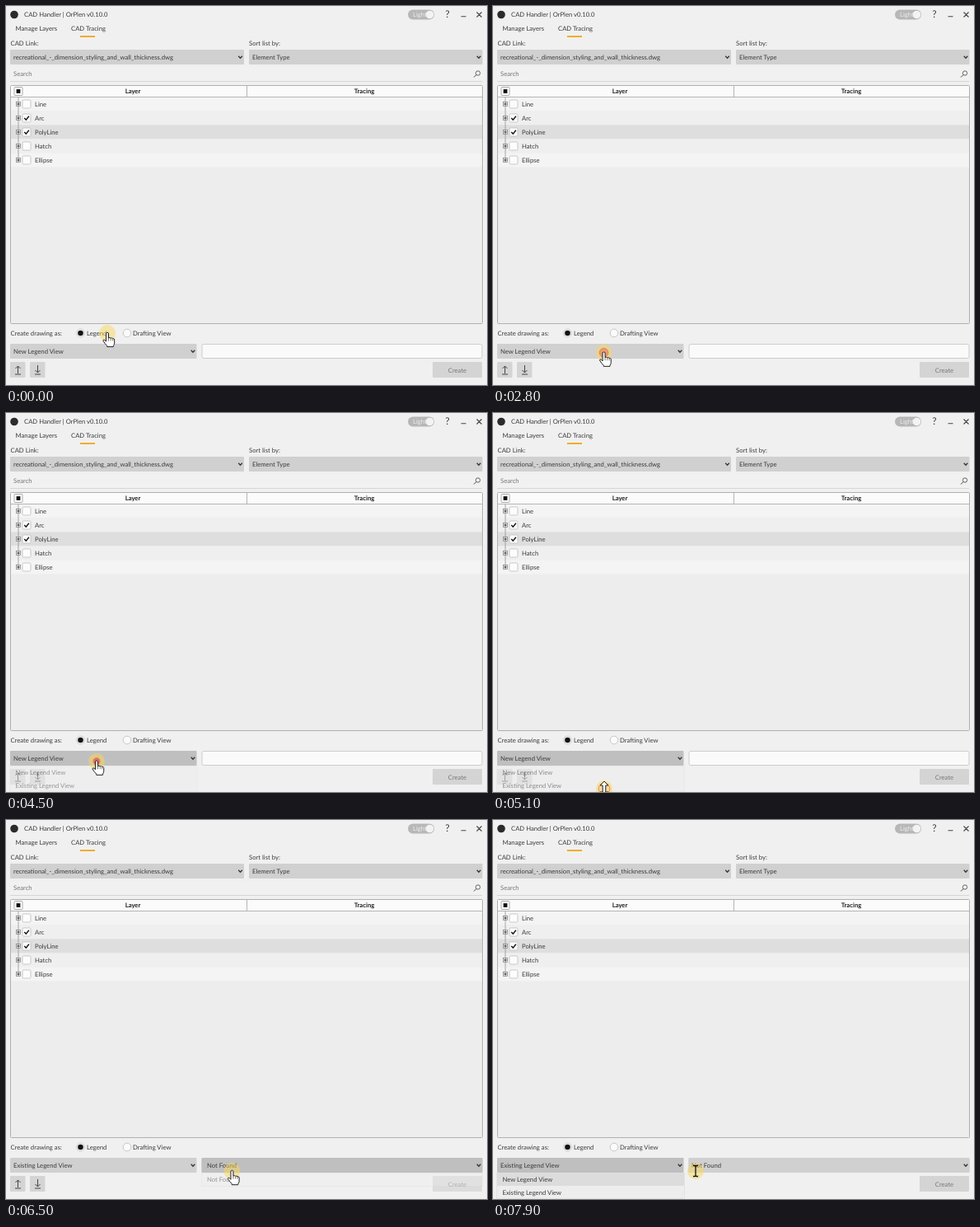
Write an HTML page that moves like this. It is 584 by 460 pixels and loops after 8000 ms.

```html
<!DOCTYPE html>
<html lang="en">
<head>
<meta charset="utf-8">
<title>Layer tracing</title>
<style>
  html, body { margin: 0; width: 100%; height: 100%; overflow: hidden; background: #f0f0f0; }
  svg { display: block; width: 584px; height: 460px; }
  text { font-family: Lato, "Open Sans", sans-serif; font-size: 7.7px; fill: #3b3b3b; text-rendering: geometricPrecision; }
  .bold { font-weight: 700; fill: #222; }
  .mid { text-anchor: middle; }
  .soft { fill: #777; }
  .line { fill: none; stroke: #444; }
</style>
</head>
<body>
<svg id="stage" viewBox="0 0 584 460"></svg>
<script>
const LOOP = 8000;
const FIELD = '#d0d0d0', ACTIVE = '#bfbfbf';
const stage = document.getElementById('stage');

const rect = (x, y, w, h, fill, extra = '') =>
  `<rect x="${x}" y="${y}" width="${w}" height="${h}" fill="${fill}" ${extra}/>`;
const text = (x, y, value, extra = '') => `<text x="${x}" y="${y}" ${extra}>${value}</text>`;
const path = (d, extra = 'class="line"') => `<path d="${d}" ${extra}/>`;
const circle = (x, y, r, extra) => `<circle cx="${x}" cy="${y}" r="${r}" ${extra}/>`;
const group = (id, content) => `<g id="${id}">${content}</g>`;
const chevron = (x, y) => path(`M${x - 2.3} ${y - 1.2}l2.3 2.4 2.3-2.4`, 'fill="none" stroke="#333" stroke-width="1.3"');
const combo = (id, x, y, w, h, label, labelX = x + 4) =>
  rect(x, y, w, h, FIELD, `rx="1" id="${id}Box"`) + text(labelX, y + h / 2 + 3, label, `id="${id}Text"`) + chevron(x + w - 4.5, y + h / 2);
const radio = (id, x) =>
  circle(x, 397, 4.8, `id="${id}Ring" fill="#fbfbfb" stroke="#bbb" stroke-width=".8"`) +
  circle(x, 397, 3.3, `id="${id}Dot" fill="#111"`);

function titleBar() {
  return circle(10, 10.5, 4.8, 'fill="#2b2b2b"') +
    text(22, 13.2, 'CAD Handler | OrPlen v0.10.0') +
    rect(488, 4.5, 32, 12, '#b7b7b7', 'rx="6"') + text(494, 13, 'Light', 'style="fill:#eee"') +
    circle(514.5, 10.5, 4.8, 'fill="#f3f3f3"') +
    text(536, 14.3, '?', 'class="mid" style="font-size:12px"') +
    path('M552.5 12.8h6M571.5 7.5l6 6m0-6l-6 6', 'class="line" stroke-width="1.1"') +
    text(11.5, 30, 'Manage Layers') + text(79, 30, 'CAD Tracing') +
    rect(90, 36, 18, 2, '#f0ad2f');
}

function filters() {
  return text(5.5, 48, 'CAD Link:') + text(295, 48, 'Sort list by:') +
    combo('link', 5, 53, 284, 18, 'recreational_-_dimension_styling_and_wall_thickness.dwg') +
    combo('sort', 295, 53, 283.5, 18, 'Element Type') +
    rect(5, 74, 573.5, 17, '#f1f1f1') + text(9, 85.2, 'Search', 'class="soft"') +
    path('M5 91.5h573', 'stroke="#d6d6d6"') +
    circle(573, 81.5, 2.7, 'class="line" stroke-width=".8"') + path('M571 83.5l-3 3');
}

function table() {
  const names = ['Line', 'Arc', 'PolyLine', 'Hatch', 'Ellipse'];
  const rows = names.map((name, i) => {
    const y = 119 + i * 17;
    const checked = i === 1 || i === 2;
    return rect(6, y - 8.5, 572, 17, i === 2 ? '#dedede' : i % 2 ? '#efefef' : '#f4f4f4') +
      rect(12.5, y - 2.5, 5, 5, '#f6f6f6', 'stroke="#777" stroke-width=".7"') +
      path(`M13.3 ${y}h3.4m-1.7-1.7v3.4`, 'stroke="#222" stroke-width=".9"') +
      rect(20, y - 5, 10, 10, '#fcfcfc', 'rx="1.5" stroke="#bbb" stroke-width=".8"') +
      (checked ? path(`M22.3 ${y}l2 2.2 3.6-4.4`, 'fill="none" stroke="#111" stroke-width="1.4"') : '') +
      text(35, y + 2.8, name);
  }).join('');
  return rect(5.5, 96.5, 573, 289, '#ededed', 'rx="1"') + rows +
    rect(6, 97, 572, 13.5, '#fbfbfb') +
    path('M6 110.5h572M292.5 97v13', 'stroke="#b5b5b5"') +
    path('M15 111v5.5m0 5v11.500m0 5v12m0 5v12m0 5v12', 'stroke="#888" stroke-width=".7"') +
    rect(10, 98.5, 10, 10, '#fff', 'rx="1" stroke="#999" stroke-width=".8"') + rect(12.6, 101.1, 4.8, 4.8, '#111') +
    text(154, 106.4, 'Layer', 'class="bold mid"') + text(435, 106.4, 'Tracing', 'class="bold mid"') +
    rect(5.5, 96.5, 573, 289, 'none', 'rx="1" stroke="#b0b0b0"');
}

function footer() {
  const arrow = (x, d) => rect(x, 432, 18.5, 19, '#d4d4d4', 'rx="1"') + path(d);
  return text(5.5, 400, 'Create drawing as:') +
    radio('legend', 90.5) + text(98, 400, 'Legend') +
    radio('drafting', 147) + text(154, 400, 'Drafting View') +
    combo('view', 5, 410, 226.5, 18, '') +
    rect(238, 410.5, 340, 17, '#fafafa', 'rx="2" stroke="#cdcdcd"') +
    group('found', combo('found', 237.500, 410, 341, 18, 'Not Found')) +
    arrow(5, 'M14.500 446v-9m-3 3l3-3 3 3M11 447h7') +
    arrow(29, 'M38.500 436v9m-3-3l3 3 3-3M35 447h7') +
    rect(518, 432, 60, 19, '#d4d4d4', 'rx="1"') + text(548, 444.5, 'Create', 'class="mid soft"');
}

function popups() {
  return group('viewMenu',
      rect(4.500, 428.500, 228, 31, '#ededed', 'stroke="#e4e4e4"') +
      rect(5, 428.5, 227, 15.500, '#dcdcdc', 'id="newHover"') +
      rect(5, 444, 227, 15, '#d3d3d3', 'id="oldHover"') +
      text(11.500, 439, 'New Legend View') + text(11.500, 455, 'Existing Legend View')) +
    group('foundMenu',
      rect(518, 444, 60, 8, '#ededed', 'opacity=".65"') +
      rect(237.500, 428.500, 341, 16, '#efefef', 'stroke="#e2e2e2"') + text(244, 439, 'Not Found'));
}

const outline = 'fill="#fff" stroke="#222" stroke-width="1" stroke-linejoin="round"';
const cursors = {
  hand: path('M-1.500 0q1.500-1.800 3 0v6q1.500-1.300 2.700.2 1.500-.8 2.400.5 1.800-.4 2.100 1.200v4q0 2-1.300 3.500v1.200H-.3v-1.200q-2.700-2.500-4.800-6.200.5-1.800 2-.8l1.600 1.800z', outline) +
    path('M1.500 6v3.500m2.700-3v3m2.400-2.700v2.700', 'class="line" stroke-width=".7"'),
  pointer: path('M0-1v13l3-2.700 2 4.900 2.300-1-2-4.700h4.200z', outline),
  resize: path('M0-9l5 5H1.800V4H5L0 9-5 4h3.200V-4H-5z', outline),
  beam: path('M-3-6.500h2q1 0 1 1 0-1 1-1h2M0-6v12m-3 .5h2q1 0 1-1 0 1 1 1h2', 'class="line" style="stroke:#111" stroke-width="1.300"')
};

stage.innerHTML = rect(0, 0, 584, 460, '#f0f0f0') + titleBar() + filters() + table() + footer() + popups() +
  group('mouse',
    circle(0, 0, 10, 'fill="#f8d75c" opacity=".5"') +
    circle(0, 0, 3, 'id="pulse"') +
    Object.entries(cursors).map(([id, shape]) => group(id, shape)).join(''));

const el = id => document.getElementById(id);
const set = (id, name, value) => el(id).setAttribute(name, value);
const clamp = v => Math.max(0, Math.min(1, v));
const ramp = (t, start, length = 200) => clamp((t - start) / length);
const within = (t, a, b) => t >= a && t < b;

// Time, x and y of the pointer; it eases between stops.
const stops = [
  [0, 123, 397], [500, 178, 398], [900, 178, 398], [1350, 110, 398], [2150, 110, 398],
  [2600, 148, 420], [2900, 130, 421], [3700, 44, 433], [3800, 44, 433], [3900, 83, 428],
  [4200, 108, 420], [4400, 108, 420], [5000, 135, 456], [5150, 135, 456], [5600, 281, 416],
  [6350, 281, 416], [6650, 268, 436], [7000, 103, 419], [7150, 103, 419], [7450, 60, 436], [7900, 246, 426]
];
const clicks = [550, 1340, 2650, 3640, 4420, 4870, 5640, 6650, 6800];

function pointerAt(t) {
  const next = stops.findIndex(stop => stop[0] > t);
  if (next < 0) return stops.at(-1).slice(1);
  const [a, b] = [stops[next - 1], stops[next]];
  const p = (t - a[0]) / (b[0] - a[0]);
  const k = p * p * (3 - 2 * p);
  return [a[1] + (b[1] - a[1]) * k, a[2] + (b[2] - a[2]) * k];
}

function drawMouse(t) {
  const [x, y] = pointerAt(t);
  set('mouse', 'transform', `translate(${x.toFixed(2)} ${y.toFixed(2)})`);
  const kind = within(t, 3100, 3950) || within(t, 4700, 4900) ? 'pointer'
    : within(t, 4900, 5250) ? 'resize'
    : t >= 7700 ? 'beam' : 'hand';
  for (const id in cursors) set(id, 'visibility', id === kind ? 'visible' : 'hidden');

  const start = clicks.findLast(c => c <= t) ?? -LOOP;
  const p = (t - start) / 400;
  set('pulse', 'visibility', p < 1 ? 'visible' : 'hidden');
  set('pulse', 'r', 2.5 + 7.5 * clamp(p));
  set('pulse', 'fill', `rgba(235,70,65,${0.9 * clamp(1.15 - p * 1.9)})`);
  set('pulse', 'stroke', `rgba(240,125,70,${clamp(1.5 - p)})`);
}

function drawScreen(t) {
  const drafting = ramp(t, 750, 150) - ramp(t, 1850, 150);
  set('draftingDot', 'opacity', drafting);
  set('legendDot', 'opacity', 1 - drafting);
  set('draftingRing', 'stroke', within(t, 800, 1950) ? '#333' : '#bbb');

  const existing = t >= 5350;
  el('viewText').textContent = existing ? 'Existing Legend View'
    : within(t, 1000, 2200) ? 'New Drafting View' : 'New Legend View';
  set('viewBox', 'fill', within(t, 3100, 6000) || t >= 7300 ? ACTIVE : FIELD);
  set('found', 'opacity', ramp(t, 5300, 150));
  set('foundBox', 'fill', within(t, 6000, 7300) ? ACTIVE : FIELD);
  set('foundText', 'x', within(t, 6000, 7300) ? 244 : 241);

  const viewMenu = ramp(t, 3150) - ramp(t, 4400) + ramp(t, 4980, 220) - ramp(t, 5850) + ramp(t, 7350);
  set('viewMenu', 'opacity', viewMenu);
  set('newHover', 'opacity', t >= 7600 ? 1 : 0);
  set('oldHover', 'opacity', within(t, 5300, 6100) ? 1 : 0);
  set('foundMenu', 'opacity', ramp(t, 6400) - ramp(t, 7250, 150));
}

const began = performance.now();
function frame() {
  const t = (performance.now() - began) % LOOP;
  drawScreen(t);
  drawMouse(t);
  requestAnimationFrame(frame);
}
frame();
</script>
</body>
</html>
```
